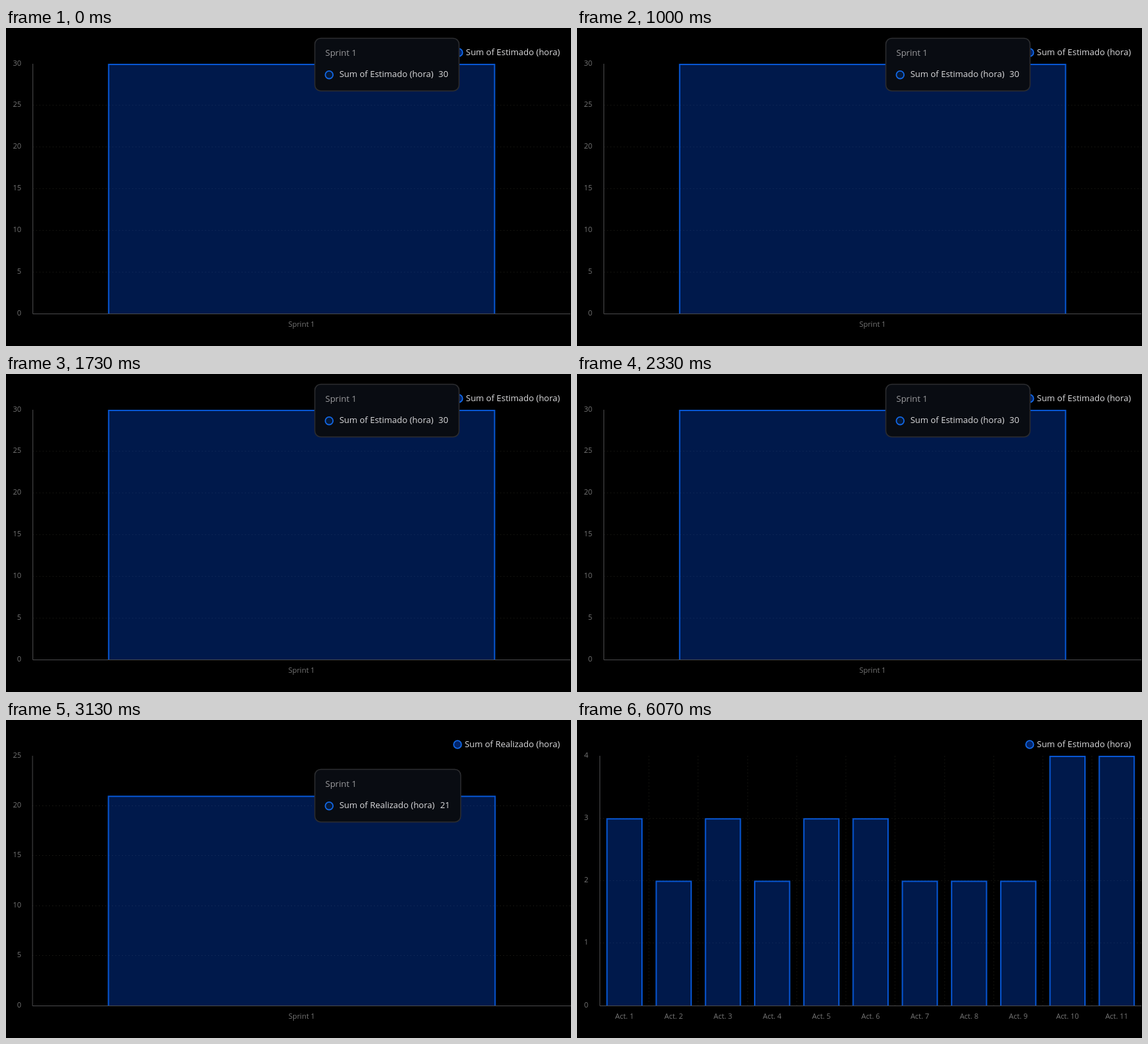
Write an HTML page that moves like this. It is 852 px wide and 480 px high and loops after 8 s.

```html
<!DOCTYPE html>
<html lang="en">
<head>
<meta charset="utf-8">
<title>Sprint hours</title>
<style>
  html, body { margin: 0; width: 100%; height: 100%; overflow: hidden; background: #000; }
  svg { display: block; width: 852px; height: 480px; font: 13px "Open Sans", "Noto Sans", sans-serif; }
  .tick { font-size: 11px; fill: #757575; }
  .label { fill: #dcdcde; }
  .title { fill: #9c9c9f; }
  .grid { stroke: #22221b; stroke-dasharray: 1 4; }
  .axis { stroke: #4b4b4d; }
  .bar { fill: rgba(0, 78, 226, .33); stroke: #0756d2; stroke-width: 2; }
  .dot { fill: #03256b; stroke: #1268e6; stroke-width: 1.8; }
  .tip { fill: #090c12; stroke: #2c2d30; stroke-width: 1.5; }
  .tip ~ .dot { fill: #071a38; }
</style>
</head>
<body>
<svg id="stage" viewBox="0 0 852 480"></svg>
<script>
const NS = "http://www.w3.org/2000/svg";
const TOP = 54.5, BASE = 431.5, LOOP = 8000;

const activities = [3, 2, 3, 2, 3, 3, 2, 2, 2, 4, 4];
const charts = [
  { start: 0, left: 40.5, right: 851, max: 30, step: 5, values: [30], names: ["Sprint 1"], barShare: .718,
    legend: "Sum of Estimado (hora)", legendX: 693.5, tip: { y: 15.5, width: 217.5, valueX: 652 } },
  { start: 2670, left: 40, right: 852, max: 25, step: 5, values: [21], names: ["Sprint 1"], barShare: .718,
    legend: "Sum of Realizado (hora)", legendX: 691.7, tip: { y: 74.5, width: 220, valueX: 654.7 } },
  { start: 6000, left: 34.5, right: 851, max: 4, step: 1, values: activities,
    names: activities.map((_, i) => `Act. ${i + 1}`), barShare: .71,
    legend: "Sum of Estimado (hora)", legendX: 693.5 }
];

function add(parent, tag, attrs, text) {
  const node = document.createElementNS(NS, tag);
  for (const key in attrs) node.setAttribute(key, attrs[key]);
  if (text !== undefined) node.textContent = text;
  parent.append(node);
  return node;
}

const line = (g, kind, x1, y1, x2, y2) => add(g, "line", { class: kind, x1, y1, x2, y2 });
const write = (g, kind, x, y, text, anchor = "start") =>
  add(g, "text", { class: kind, x, y, "text-anchor": anchor }, text);
const dot = (g, cx, cy) => add(g, "circle", { class: "dot", cx, cy, r: 5.8 });

function drawTip(g, chart) {
  const { y, width, valueX } = chart.tip;
  add(g, "rect", { class: "tip", x: 465.7, y, width, height: 79.5, rx: 9 });
  write(g, "title", 481.5, y + 26, chart.names[0]);
  dot(g, 487.3, y + 55.2);
  write(g, "label", 502.7, y + 58.5, chart.legend);
  write(g, "label", valueX, y + 58.5, chart.values[0]);
}

function drawChart(chart) {
  const g = add(document.getElementById("stage"), "g", {});
  const { left, right, max, step, values, names } = chart;
  const band = (right - left) / values.length;
  const yOf = value => BASE - value / max * (BASE - TOP);

  for (let v = 0; v <= max; v += step) {
    const y = Math.round(yOf(v)) - .5;
    if (v > 0 && v < max) line(g, "grid", left, y, right, y);
    write(g, "tick", 23 - (max < 10 ? 6 : 0), y + 2.5, v, "end");
  }
  for (let i = 1; i < values.length; i++) {
    const x = Math.floor(left + i * band) + .5;
    line(g, "grid", x, TOP, x, BASE);
  }

  values.forEach((value, i) => {
    const center = left + (i + .5) * band;
    const half = band * chart.barShare / 2;
    const top = yOf(value) + .4;
    add(g, "path", { class: "bar",
      d: `M${center - half} ${BASE}V${top}H${center + half}V${BASE}` });
    write(g, "tick", center, 451.2, names[i], "middle");
  });

  line(g, "axis", left, TOP - .5, left, BASE);
  line(g, "axis", left, BASE, right, BASE);
  dot(g, chart.legendX - 10.8, 37);
  write(g, "label", chart.legendX, 41, chart.legend);
  if (chart.tip) drawTip(g, chart);
  return g;
}

const groups = charts.map(drawChart);

function render(now) {
  const time = now % LOOP;
  const active = charts.findLastIndex(chart => time >= chart.start);
  groups.forEach((g, i) => g.setAttribute("visibility", i === active ? "visible" : "hidden"));
}

function tick() {
  render(performance.now());
  requestAnimationFrame(tick);
}
tick();
</script>
</body>
</html>
```
